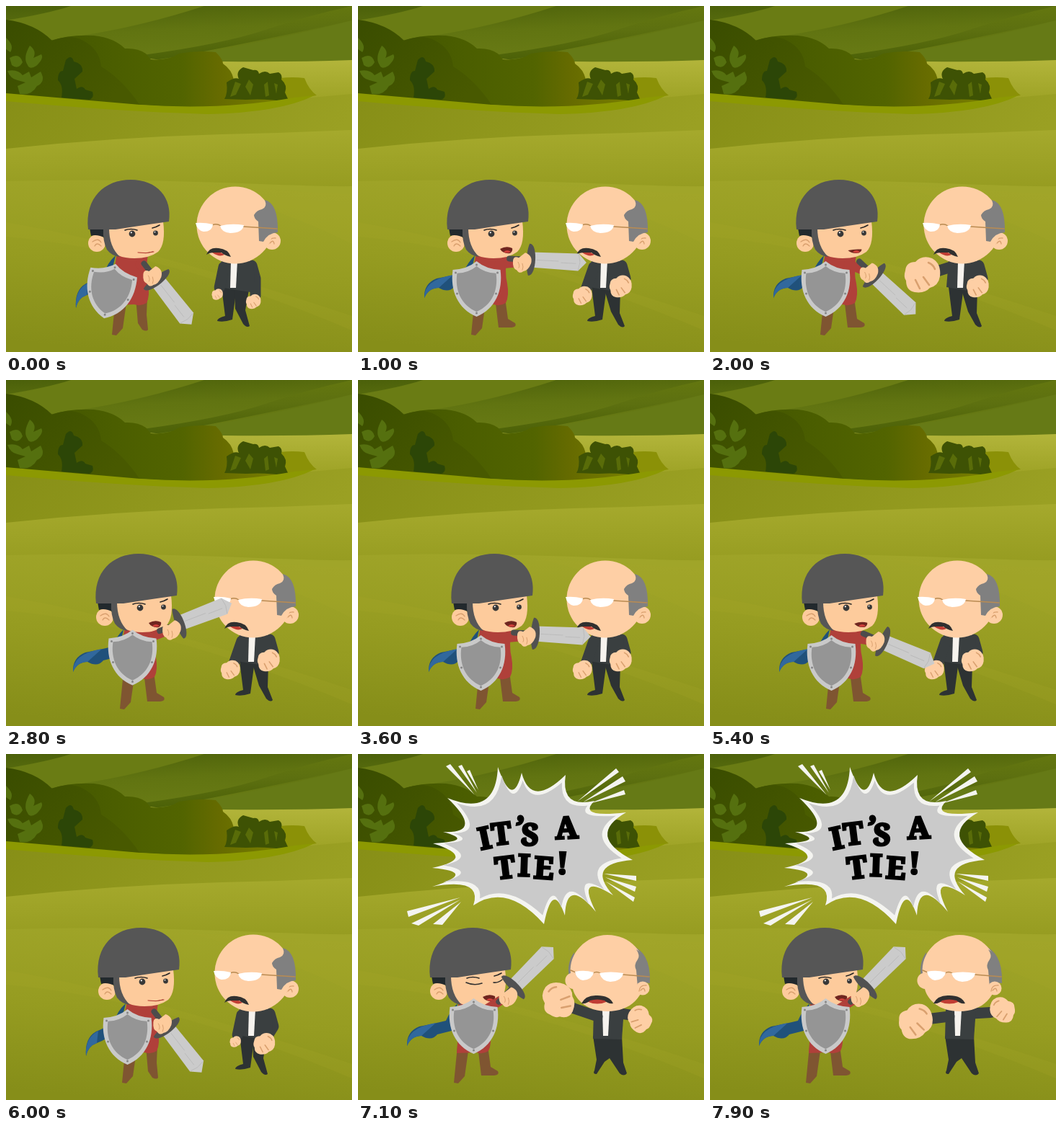
Recreate the animation shown at these times as an HTML page. Size 480 px wide and 480 px high, loop 8.1 s.

```html
<!DOCTYPE html>
<html lang="en">
<head>
<meta charset="utf-8">
<title>It's a tie</title>
<style>
html, body { margin: 0; width: 100%; height: 100%; overflow: hidden; background: #959a22; }
svg { display: block; width: 100vw; height: 100vh; }
text { font: 900 42px "Noto Serif", serif; text-anchor: middle; stroke: #000; stroke-width: 3; }
</style>
</head>
<body>
<svg viewBox="0 0 480 480">
  <defs>
    <linearGradient id="hill" x2=".25" y2="1">
      <stop stop-color="#4b600a"/><stop offset=".45" stop-color="#617411"/><stop offset="1" stop-color="#6b7d16"/>
    </linearGradient>
    <linearGradient id="ridge" x2=".12" y2="1">
      <stop stop-color="#66790f"/><stop offset=".5" stop-color="#5d7010"/><stop offset="1" stop-color="#4b6007"/>
    </linearGradient>
    <linearGradient id="far" x2="0" y2="1"><stop stop-color="#b3b53b"/><stop offset="1" stop-color="#9ea326"/></linearGradient>
    <linearGradient id="wood">
      <stop stop-color="#3d5000"/><stop offset=".35" stop-color="#4a5d00"/><stop offset=".62" stop-color="#526400"/>
      <stop offset=".75" stop-color="#666b00"/><stop offset="1" stop-color="#7c8300"/>
    </linearGradient>
    <linearGradient id="tree" x2="1" y2=".5"><stop stop-color="#3a4d00"/><stop offset="1" stop-color="#485900"/></linearGradient>
    <linearGradient id="f1" x2="1" y2=".2"><stop stop-color="#878f17"/><stop offset="1" stop-color="#9aa023"/></linearGradient>
    <linearGradient id="f2" x2=".05" y2="1"><stop stop-color="#a6aa2d"/><stop offset="1" stop-color="#959b20"/></linearGradient>
    <linearGradient id="f3" x1=".55" x2=".35" y2="1">
      <stop stop-color="#a0a529"/><stop offset=".5" stop-color="#969c21"/><stop offset="1" stop-color="#868e19"/>
    </linearGradient>
  </defs>
  <path fill="url(#hill)" d="M0,0H480V90H0Z"/>
  <path fill="#6a7c14" d="M0,20Q60,10 90,0H275Q190,28 100,42L62,49Z"/>
  <path fill="url(#ridge)" d="M190,68Q300,53 360,33T480,0V20Q390,40 320,54T206,76Z"/>
  <path fill="#667a16" d="M205,75Q330,58 480,20V78H205Z"/>
  <path fill="url(#far)" d="M195,73Q250,78 300,77Q400,78 480,75V130H300Z"/>
  <path fill="#8b9107" d="M380,100Q398,98 414,100Q420,116 431,124L380,132Z"/>
  <path fill="url(#wood)" d="M0,30L62,48Q90,39 122,41Q150,44 165,59Q183,58 194,66L201,74Q225,76 240,66Q266,61 291,64Q301,74 301,80Q313,88 316,102L394,133Q320,146 260,142L0,125Z"/>
  <path fill="url(#tree)" d="M0,19Q40,24 64,48Q88,39 105,47Q130,59 132,84Q162,102 186,138L0,123Z"/>
  <path fill="#55700f" d="M33,55Q43,62 38,72L49,67Q53,73 42,83Q33,89 30,82Q23,72 33,55ZM0,44Q12,55 6,64L0,60ZM5,72Q19,64 23,78Q17,89 8,82ZM2,90Q16,87 23,96L32,91L35,99L48,91Q56,105 43,111Q35,125 19,122L16,111L27,106L16,103Q6,101 2,90Z"/>
  <path fill="#2c4607" d="M83,75Q91,66 94,77Q107,80 106,91L95,101L98,115Q106,109 110,116L120,119Q123,128 115,130L77,127Q80,110 72,103Q72,90 79,90Z"/>
  <path fill="#3e5204" d="M303,129Q308,121 306,106Q317,98 323,101Q318,91 329,85L343,89Q350,88 351,94Q360,88 366,94L378,92Q384,95 382,102Q391,110 387,120L393,133Q360,128 333,130Z"/>
  <path fill="#596c09" d="M318,105L326,108L319,123L311,126ZM337,102L343,109L339,124L332,112ZM358,109L363,105L365,124L360,126ZM372,107L377,109L375,122Z"/>
  <path fill="url(#f1)" d="M0,124L186,138Q310,148 390,130L480,122V260H0Z"/>
  <path fill="#8c9902" d="M0,121L186,137Q300,145 400,127L428,124Q380,148 280,150Q150,146 0,132Z"/>
  <path fill="url(#f2)" d="M0,198Q150,182 300,178Q390,176 480,172V262H0Z"/>
  <path fill="url(#f3)" d="M0,243Q150,239 300,245T480,250V480H0Z"/>
  <path fill="#a3a62c" opacity=".2" d="M250,248L480,262V330Q380,280 250,248ZM0,300Q180,330 480,430V450Q220,340 0,320Z"/>
  <g id="boom">
    <path fill="#f4f4f0" d="M122,17L128,14L162,57ZM139,17L144,15L165,54ZM151,24L155,22L167,50ZM358,20L362,25L304,66ZM367,31L371,38L312,67ZM369,50L371,56L320,69ZM341,166L386,169V176ZM343,171L386,184L384,191ZM344,177L384,199L382,205ZM142,199L68,218L70,226ZM142,202L74,235L84,238ZM143,205L104,236L117,237Z"/>
    <path id="outer" fill="#f4f4f0"/>
    <path id="inner" fill="#cacaca"/>
    <text x="179 201 222 238 260 290" y="133 127 115 126 124 118" rotate="-12 -7 8 3 0 -3">IT’S A</text>
    <text x="206 230 257 283" y="174 169 172 166" rotate="-7 2 4 2">TIE!</text>
  </g>
  <g id="cast"></g>
</svg>
<script>
const SKIN = '#fdcb9c', PALE = '#fecfa5', LINE = '#d9a06f', STEEL = '#565656', SUIT = '#3a3f40', DARK = '#2d3233', RED = '#b0403a';
const $ = id => document.getElementById(id);
const lerp = (a, b, t) => a + (b - a) * t;
const mixAll = (a, b, t) => a.map((v, i) => lerp(v, b[i], t));
const fill = (c, d) => `<path fill="${c}" d="${d}"/>`;
const line = (c, w, d) => `<path fill="none" stroke="${c}" stroke-width="${w}" stroke-linecap="round" stroke-linejoin="round" d="${d}"/>`;
const dot = (c, x, y, r) => `<circle fill="${c}" cx="${x}" cy="${y}" r="${r}"/>`;
const group = (tf, ...parts) => `<g transform="${tf}">${parts.join('')}</g>`;

// Blend two paths that share the same structure
function morph(a, b, t) {
  const nums = b.match(/-?[\d.]+/g);
  let i = 0;
  return a.replace(/-?[\d.]+/g, n => lerp(+n, +nums[i++], t).toFixed(1));
}

// Pose at a step, from keys [step, pose]
function poseAt(keys, step) {
  const k = keys.findIndex(key => key[0] > step);
  if (k < 0) return keys[keys.length - 1][1];
  const [s0, a] = keys[k - 1], [s1, b] = keys[k];
  return mixAll(a, b, (step - s0) / (s1 - s0));
}

// Speech burst: tip x, y, then the valley that follows it
const SPIKES = [[194,18,212,56],[227,26,246,57],[288,29,292,64],[328,65,322,82],[372,81,340,113],[381,147,336,160],
  [354,196,318,180],[330,219,298,190],[287,224,272,196],[258,236,206,196],[160,210,156,182],
  [103,184,142,168],[103,158,142,144],[104,124,142,119],[118,108,154,101],[124,61,178,70]];
function burst(tip, valley) {
  const at = (x, y, s) => [242 + (x - 242) * s, 124 + (y - 124) * s];
  const tips = SPIKES.map(p => at(p[0], p[1], tip));
  return 'M' + tips[0] + SPIKES.map((p, i) => {
    const a = tips[i], b = tips[(i + 1) % tips.length], v = at(p[2], p[3], valley);
    const ctrl = v.map((c, j) => c * 1.5 - (a[j] + b[j]) / 4);
    return `Q${ctrl} ${b}`;
  }).join('') + 'Z';
}
$('outer').setAttribute('d', burst(1, .96));
$('inner').setAttribute('d', burst(.89, .91));

// Knight pose: x, shield x y angle, sword x y angle, stride, mouth
const knight = (x, shield, sword, stride, mouth) => [x, ...shield, ...sword, stride, mouth];
const LOW = [160.5, 393, 0], HIGH = [180.5, 378, 0], DOWN = [216, 381, 52];
const rest = knight(-6, [150, 396, 12], DOWN, 0, 0);
const calm = x => knight(x, LOW, DOWN, 0, 0);
const ready = x => knight(x, LOW, [229, 375, 43], 1, .6);
const thrust = x => knight(x, LOW, [236, 352, 3], 1, 1);
const raise = x => knight(x, HIGH, [236.5, 322.5, -45], 1, 1);
const KNIGHT = [[0, rest], [1, rest], [3, ready(-5)], [5, thrust(4)], [7, calm(8)], [10, ready(0)], [13, raise(0)],
  [15, thrust(10)], [16, ready(6)], [18, thrust(10)], [20, ready(4)], [23, raise(0)], [26, thrust(10)],
  [28, ready(6)], [30, calm(8)], [32, raise(-20)]];

// Man pose: x, left fist x y size, right fist x y size, stride
const stand = [-32, 325, 400, 7.5, 375, 410, 10, 0];
const guard = [-7, 318, 402, 13, 371, 389, 15, 1];
const punch = [0, 294, 373, 24, 371, 389, 15, 1];
const loose = [-7, 325, 399, 7.5, 365, 402, 14.5, 0];
const MAN = [[0, stand], [1, stand], [3, guard], [6, guard], [8, punch], [10, punch], [12, guard], [15, guard],
  [16, punch], [18, guard], [20, guard], [22, punch], [23, punch], [25, guard], [28, guard], [30, loose]];

function knightBody(p, shut) {
  const [stride, mouth] = p.slice(7);
  const cape = morph(
    'M158,346Q146,357 143,370Q130,380 117,385Q101,394 103,419Q106,405 118,401Q132,396 138,388L150,380Z',
    'M158,346Q148,356 142,370Q126,374 105,378Q87,385 88,405Q94,391 108,391Q122,399 130,389L150,384Z', stride);
  const light = morph('M120,384Q101,394 103,419Q106,405 118,401Z', 'M128,373Q87,380 88,405Q94,391 108,391Z', stride);
  const foot = morph('M186,405L202,405L201,428L203,449Q201,452 195,449L189,440Z',
    'M186,405L200,405L204,434L214,440Q217,445 209,446L191,446Z', stride);
  const eyes = shut
    ? line('#303030', 1.6, 'M170,317Q181,322 192,318M208,317Q214,318 220,313')
    : dot('#383838', 181, 316, 4.4) + dot('#383838', 213.5, 315, 3.4) + dot('#fff', 179.8, 314.3, 1.1) + dot('#fff', 212.5, 313.6, .9);
  return group(`translate(${p[0]})`,
    fill('#20517b', cape), fill('#31689d', light),
    fill('#7f5531', 'M158,405L174,405L168,447L159,457L153,456Z'), fill('#7f5531', foot),
    fill(RED, 'M160,343L203,344Q199,370 203,385Q206,402 201,412Q193,417 184,414L157,415Q160,380 157,360Z'),
    dot(SKIN, 132, 329, 12), line(LINE, 1.3, 'M126,327Q134,321 138,328M129,333Q132,327 138,333'),
    fill('#22292d', 'M122,308H146L144,322Q132,316 124,319Z'),
    fill(SKIN, 'M144,306L224,299Q228,330 217,341Q205,350 184,350Q158,350 149,335Z'),
    fill(STEEL, 'M141,308H149Q149,334 164,348Q153,347 146,338Q140,326 141,308Z'),
    fill(STEEL, 'M120,310C115,266 143,241 179,241C216,241 237,266 232,299Q190,305 158,310Z'),
    line('#252525', 1.6, 'M171,311Q179,308 188,311M209,308Q214,307 219,304'), eyes,
    fill('#6f2620', morph('M189,342Q199,344 211,340Q210,341 206,342Q197,344 189,342Z',
      'M193,337Q202,332 210,336Q211,340 207,343Q197,344 193,337Z', mouth)),
    mouth > .4 ? fill('#cf3f3a', 'M198,341Q203,337 208,341Q203,344 198,341Z') : line('#b3392f', 1, 'M189,342Q200,344 211,341'));
}

function swordArm([dx, , , , x, y, angle]) {
  const a = angle * Math.PI / 180, hx = x - 14 * Math.cos(a), hy = y - 14 * Math.sin(a) + 4;
  return group(`translate(${dx})`,
    line(RED, 13, `M192,358L${lerp(192, hx, .75)},${lerp(358, hy, .75)}`),
    group(`translate(${x} ${y}) rotate(${angle})`,
      fill('#cbcbcb', 'M0,-10.5L66,-12L77,0L66,12L0,10.5Z'), line('#b8b8b8', .8, 'M8,0H38M42,2H62M66,-11L68,0L66,11'),
      line('#4c4c4c', 8, 'M-30,0H-6'), fill('#515151', 'M-3,-22C9,-24 9,24 -3,22C-7,12 -7,-12 -3,-22Z')),
    group(`translate(${hx} ${hy})`,
      fill(SKIN, 'M-11,-2Q-10,-9 -3,-6L6,-13Q17,-9 14,2Q10,12 3,13Q-2,17 -6,11Q-12,9 -11,-2Z'),
      line(LINE, 1, 'M-4,0Q-1,5 -3,8M2,2Q4,7 2,11')));
}

function shield([dx, x, y, angle]) {
  const shape = 'M0,-39Q13,-28 33,-27C37,2 26,27 0,38C-26,27 -37,2 -33,-27Q-13,-28 0,-39Z';
  const studs = [[0, -34], [29, -23], [-29, -23], [27, 6], [-27, 6], [0, 33]];
  return group(`translate(${dx + x} ${y}) rotate(${angle})`, fill('#c9c9c9', shape),
    group('scale(.82)', fill('#959595', shape)), ...studs.map(s => dot('#858585', ...s, 1.5)));
}

const fist = (x, y, size, turn = 0, flip = 1) => group(`translate(${x} ${y}) scale(${size / 24 * flip} ${size / 24}) rotate(${turn})`,
  fill(PALE, 'M-23,-6Q-22,-18 -9,-18Q0,-28 14,-23Q27,-16 25,2Q23,15 11,18Q4,26 -10,24Q-22,22 -22,8Q-26,3 -23,-6Z'),
  line(LINE, 2.6, 'M-9,7L-3,19M2,3L10,14M9,-17Q16,-14 18,-8'));
const sleeve = (...pts) => line(SUIT, 15, 'M' + pts.join('L'));

function manHead(front) {
  const ear = (x, y, r) => dot(PALE, x, y, r) + line(LINE, 1.3, `M${x - 5},${y + 4}Q${x - 4},${y - 5} ${x + 5},${y - 4}M${x - 3},${y + 3}Q${x + 2},${y - 3} ${x + 3},${y + 4}`);
  if (front) return [
    fill('#808080', 'M300,275Q289,290 293,310L302,305ZM380,266Q405,275 405,313L390,322L384,300Z'),
    fill(PALE, 'M346,251C378,251 399,276 399,303C399,337 378,357 346,357C319,357 302,342 298,326C285,324 284,307 295,304C292,277 316,251 346,251Z'),
    fill('#808080', 'M386,271Q405,282 405,318L398,317L388,324L386,300Q382,293 388,285Q392,280 386,271Z'),
    ear(395, 325, 9.5),
    line('#b98b52', 1.4, 'M295,300L302,303M326,304Q331,301 336,304M367,306L404,309'),
    fill('#fff', 'M301,302Q314,299 327,303Q325,313 312,314Q303,312 301,302ZM335,304Q350,301 368,304Q366,315 350,316Q338,315 335,304Z'),
    fill('#c03d34', 'M317,343Q332,336 347,343Q332,350 317,343Z'),
    fill('#303030', 'M310,346Q316,334 332,335Q349,335 354,346Q347,347 342,342Q332,339 322,342Q317,347 310,346Z')
  ].join('');
  return [
    ear(401, 326, 12), `<ellipse cx="350" cy="304" rx="53.5" ry="53.5" fill="${PALE}"/>`,
    fill('#808080', 'M391,269Q410,274 409,314Q395,315 389,327L383,326L382,299Q376,295 376,290Q380,283 387,282Q395,279 391,269Z'),
    line('#b98b52', 1.4, 'M318,304Q324,301 330,305M361,306L408,309'),
    fill('#fff', 'M295,301Q307,300 319,303Q318,313 306,313Q297,311 295,301ZM329,305Q345,301 362,304Q360,315 343,315Q331,314 329,305Z'),
    fill('#c03d34', 'M318,342Q327,339 335,345Q328,349 318,342Z'),
    fill('#303030', 'M310,345Q314,334 327,336Q340,337 344,348Q335,346 331,342L321,342Q314,342 310,345Z')
  ].join('');
}

function man(step) {
  const [x, lx, ly, ls, rx, ry, rs, stride] = poseAt(MAN, step);
  const foot = morph('M349,394L369,394L364,422L370,444Q366,447 361,441L350,420Z',
    'M349,394L371,394L370,426L377,444Q374,448 368,442L358,424Z', stride);
  return group(`translate(${x})`,
    sleeve([373, 360], [378, 378], [rx + 3, ry - 8]),
    fill(DARK, 'M331,390H352L346,435Q334,439 325,437Q325,433 336,430Z'), fill(DARK, foot),
    fill(SUIT, 'M331,353H375L378,398L352,394L328,390Z'), fill('#f6f3ee', 'M344,354L353,354L351,391H343Z'),
    sleeve([334, 362], [lerp(334, lx, .65), lerp(362, ly, .75)]),
    manHead(false), fist(rx, ry, rs), fist(lx, ly, ls));
}

function manCheer(step) {
  const t = step < 35 ? 1 : (1 - Math.cos((step - 35) * Math.PI * .75)) / 2;
  const [lx, ly, rx, ry, turn] = mixAll([278, 342, 391, 368, -75], [285, 371, 406, 355, -10], t);
  return sleeve([364, 360], [lerp(364, rx, .6), lerp(360, ry, .3)], [rx, ry]) +
    fill(DARK, 'M326,391H366L368,428L373,443Q369,448 363,443L349,422L342,427L331,444Q325,444 328,439L331,424Z') +
    fill(SUIT, 'M327,354H369L366,396L326,395Z') + fill('#f6f3ee', 'M339,354H349L347,391H340Z') +
    sleeve([332, 364], [lerp(332, lx, .6), lerp(364, ly, .5)], [lx, ly]) +
    manHead(true) + fist(lx, ly, 23, turn) + fist(rx, ry, 17, turn / 2, -1);
}

const CHEER = 32;
let shown = -1;
function draw(now) {
  const t = now % 8100;
  const step = t < 7100 ? Math.min(34, Math.floor(t / 200)) : 35 + Math.floor((t - 7100) / 200);
  if (step !== shown) {
    shown = step;
    const p = poseAt(KNIGHT, step);
    $('boom').style.display = step >= CHEER ? '' : 'none';
    $('cast').innerHTML = knightBody(p, step === 35) + (step < CHEER ? man(step) : manCheer(step)) + swordArm(p) + shield(p);
  }
  requestAnimationFrame(draw);
}
draw(performance.now());
</script>
</body>
</html>
```
